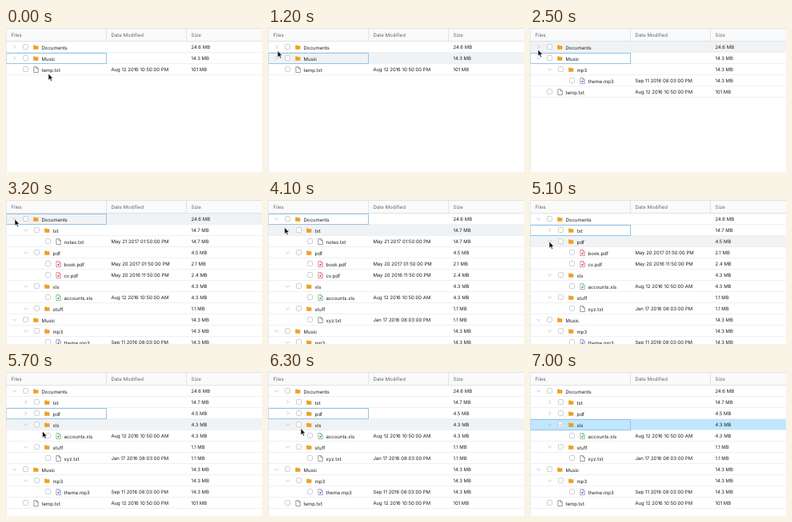
An HTML page for the animation above (7.7 s loop, 320 px wide and 180 px high).

```html
<!DOCTYPE html>
<html lang="en">
<head>
<meta charset="utf-8">
<title>File tree</title>
<style>
  html, body { margin: 0; width: 100%; height: 100%; overflow: hidden; background: #fff; }
  #stage { display: block; width: 100%; height: 100%; }
  text { font: 6px Inter, Roboto, sans-serif; fill: #1c1c1c; text-rendering: geometricPrecision; }
  .head { font-size: 6.1px; fill: #666; }
  .line { stroke: #eff0f2; }
  .chevron { fill: none; stroke: #a5abb0; stroke-width: .7; }
  .box { fill: #fff; stroke: #c6cacd; stroke-width: .9; }
  .tick { fill: none; stroke: #9aa3aa; stroke-width: .8; }
  .focus { fill: none; stroke: #94c4e6; }
</style>
</head>
<body>
<svg id="stage" viewBox="0 0 320 180">
  <rect width="320" height="180" fill="#fff"/>
  <g id="tree" transform="translate(0 17)"></g>
  <rect width="320" height="16.6" fill="#fafafa"/>
  <path d="M0 .5H320M0 16.5H320M125.5 0V16M225.5 0V16M.2 0V180" stroke="#e0e2e4"/>
  <text class="head" x="6.5" y="10.8">Files</text>
  <text class="head" x="131.5" y="10.8">Date Modified</text>
  <text class="head" x="231.5" y="10.8">Size</text>
  <path id="cursor" d="M0 0V8.2L1.9 6.5 3.2 9.4 4.6 8.8 3.3 6H5.8Z" fill="#111" stroke="#fff" stroke-width=".6"/>
</svg>
<script>
const LOOP = 7700, STEP = 100, ROW = 14, SLIDE = 300;

const file = (name, date, size) => ({ name, date, size });
// toggles: times at which the folder opens or closes
const folder = (name, size, open, toggles, ...children) => ({ name, size, open, toggles, children });

const roots = [
  folder('Documents', '24.6 MB', false, [3000],
    folder('txt', '14.7 MB', true, [4480],
      file('notes.txt', 'May 21 2017 01:50:00 PM', '14.7 MB')),
    folder('pdf', '4.5 MB', true, [5150],
      file('book.pdf', 'May 20 2017 01:50:00 PM', '2.1 MB'),
      file('cv.pdf', 'May 20 2016 11:50:00 PM', '2.4 MB')),
    folder('xls', '4.3 MB', true, [],
      file('accounts.xls', 'Aug 12 2016 10:50:00 AM', '4.3 MB')),
    folder('stuff', '1.1 MB', true, [],
      file('xyz.txt', 'Jan 17 2016 08:03:00 PM', '1.1 MB'))),
  folder('Music', '14.3 MB', false, [1700],
    folder('mp3', '14.3 MB', true, [],
      file('theme.mp3', 'Sep 11 2016 08:03:00 PM', '14.3 MB'))),
  file('temp.txt', 'Aug 12 2016 10:50:00 PM', '101 MB')
];

const hovers = [[0, ''], [900, 'Music'], [2500, 'Documents'], [4000, 'txt'], [4700, 'pdf'], [5500, 'xls'], [6700, '']];
const focuses = [[0, 'Music'], [3000, 'Documents'], [4400, 'txt'], [5150, 'pdf'], [6400, 'xls']];
const SELECT_AT = 6400;
const path = [
  [100, 53, 57], [800, 20, 33], [1200, 12, 28.5], [1600, 10, 36], [1900, 10, 36],
  [2500, 10, 27], [2800, 11, 24], [3700, 11, 24], [4300, 24, 38], [4400, 24, 38],
  [4600, 26, 50], [4900, 24, 52], [5200, 24, 52], [5700, 45.5, 74], [6200, 44, 75],
  [6400, 38, 66], [6600, 38, 66], [7000, -12, 132]
];

const fileColors = { txt: '#555', pdf: '#d2414c', xls: '#4a9a55', mp3: '#6a62b5' };

function add(parent, tag, attrs, text) {
  const el = document.createElementNS('http://www.w3.org/2000/svg', tag);
  for (const key in attrs) el.setAttribute(key, attrs[key]);
  if (text) el.textContent = text;
  parent.append(el);
  return el;
}

function drawIcon(g, node, x) {
  if (node.children) {
    add(g, 'path', { d: `M${x + 34.2} 4.5H${x + 36.6}L${x + 37.4} 5.3H${x + 40.4}V9.8H${x + 34.2}Z`, fill: '#eda022' });
    return;
  }
  const type = node.name.split('.').pop(), color = fileColors[type];
  add(g, 'path', {
    d: `M${x + 34.9} 3.6H${x + 38.2}L${x + 40.3} 5.7V10.6H${x + 34.9}ZM${x + 38.2} 3.6V5.7H${x + 40.3}`,
    fill: '#fff', stroke: color, 'stroke-width': .6
  });
  if (type !== 'txt') add(g, 'rect', { x: x + 36.6, y: 7, width: 1.9, height: 1.9, fill: color });
}

function build(parent, node, depth) {
  const x = depth * 14;
  const g = node.group = add(parent, 'g', {});
  node.back = add(g, 'rect', { width: 320, height: ROW });
  add(g, 'path', { class: 'line', d: `M0 ${ROW - .5}H320` });
  if (node.children) node.chevron = add(g, 'path', { class: 'chevron' });
  add(g, 'rect', { class: 'box', x: x + 21.5, y: 3.5, width: 6, height: 6, rx: 1 });
  node.tick = add(g, 'path', { class: 'tick', d: `M${x + 22.8} 6.6l1.4 1.4 2.5-2.9` });
  drawIcon(g, node, x);
  add(g, 'text', { x: x + 44.5, y: 9.5 }, node.name);
  add(g, 'text', { x: 131.4, y: 8.7 }, node.date);
  add(g, 'text', { x: 231.5, y: 8.7 }, node.size);
  node.focus = add(g, 'rect', { class: 'focus', x: .5, y: .5, width: 125, height: ROW - 1 });
  node.x = x;
  if (node.children) {
    node.clip = add(g, 'svg', { y: ROW, width: 320, overflow: 'hidden' });
    node.children.forEach(child => build(node.clip, child, depth + 1));
  }
}

const latest = (list, t) => list.filter(([at]) => at <= t).pop()[1];

function openness(node, t) {
  let open = node.open, amount = +open;
  for (const at of node.toggles) {
    if (t < at) break;
    open = !open;
    const left = (1 - Math.min(1, (t - at) / SLIDE)) ** 2;
    amount = open ? 1 - left : left;
  }
  return { open, amount };
}

const show = (el, on) => el.setAttribute('display', on ? 'inline' : 'none');

// Places a list of nodes and returns their total height.
function layout(nodes, state) {
  let y = 0;
  for (const node of nodes) {
    const selected = state.selected === node.name;
    node.group.setAttribute('transform', `translate(0 ${y})`);
    node.back.setAttribute('fill', selected ? '#c0e7ff' : state.hover === node.name ? '#f0f3f5' : '#fff');
    show(node.tick, selected);
    show(node.focus, state.focus === node.name);
    y += ROW;
    if (!node.children) continue;
    const { open, amount } = openness(node, state.t);
    node.chevron.setAttribute('d', open
      ? `M${node.x + 8.4} 5.8l2.2 2.1 2.2-2.1`
      : `M${node.x + 9.6} 4.4l2.1 2.2-2.1 2.2`);
    const height = layout(node.children, state) * amount;
    node.clip.setAttribute('height', height);
    // A closing folder drops its rows at once; only the gap shrinks.
    show(node.clip, open && height > 0);
    y += height;
  }
  return y;
}

function cursorAt(t) {
  const next = path.findIndex(([at]) => at > t);
  if (next === 0) return path[0].slice(1);
  if (next < 0) return path[path.length - 1].slice(1);
  const [t0, x0, y0] = path[next - 1], [t1, x1, y1] = path[next];
  const u = (t - t0) / (t1 - t0), k = u * u * (3 - 2 * u);
  return [x0 + (x1 - x0) * k, y0 + (y1 - y0) * k];
}

const tree = document.getElementById('tree');
const cursor = document.getElementById('cursor');
roots.forEach(node => build(tree, node, 0));

function render(t) {
  layout(roots, {
    t,
    hover: latest(hovers, t),
    focus: latest(focuses, t),
    selected: t >= SELECT_AT ? 'xls' : null
  });
  cursor.setAttribute('transform', `translate(${cursorAt(t).join(' ')})`);
}

const start = performance.now();
function tick() {
  const t = (performance.now() - start) % LOOP;
  render(Math.floor(t / STEP) * STEP);
  requestAnimationFrame(tick);
}
tick();
</script>
</body>
</html>
```
